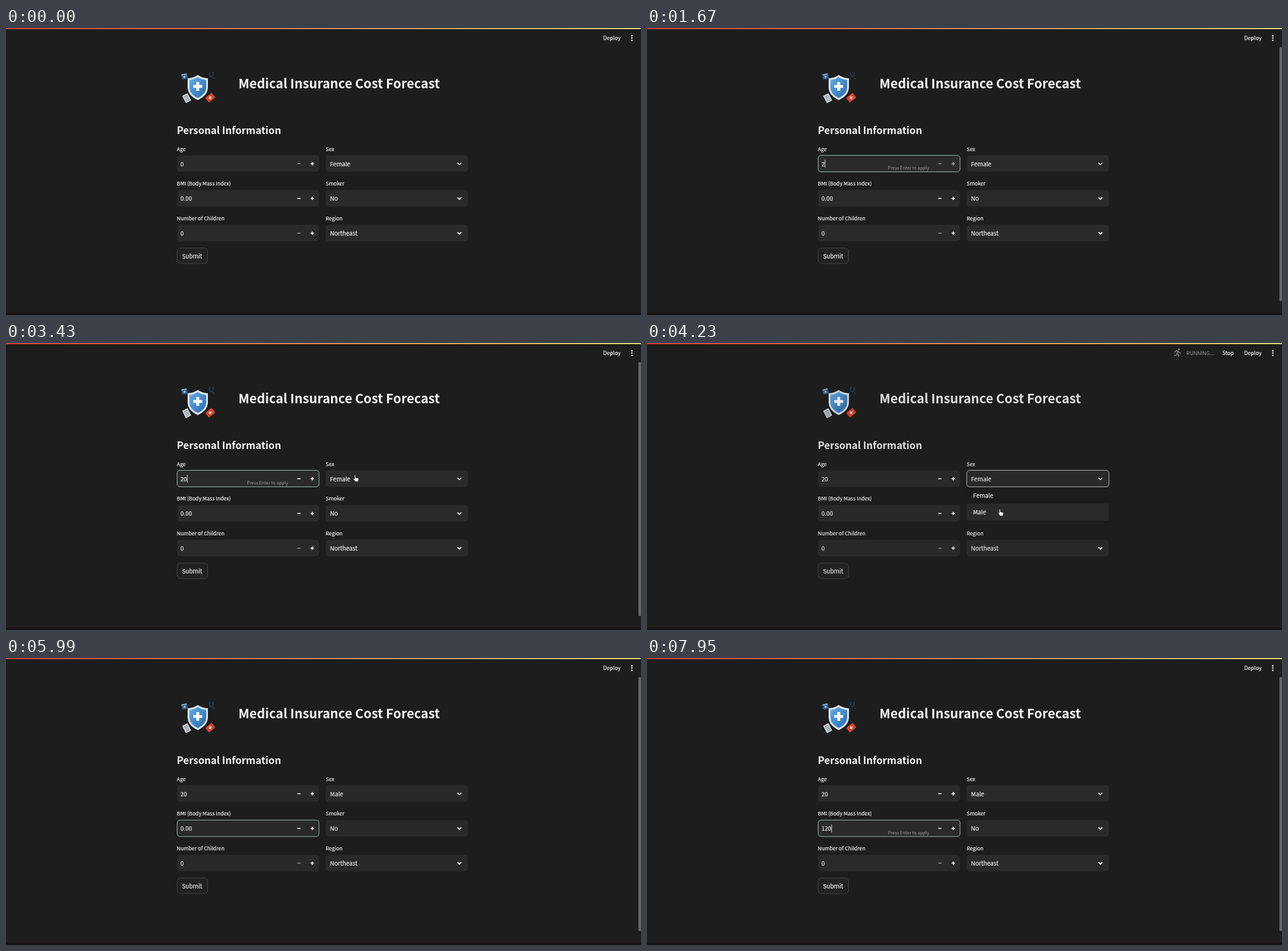
An HTML page that plays this animation: 1000x452 px, repeating every 8000 ms.

```html
<!DOCTYPE html>
<html lang="en">
<head>
<meta charset="utf-8">
<title>Medical Insurance Cost Forecast</title>
<style>
  html, body { margin: 0; width: 100%; height: 100%; overflow: hidden; background: #1d1d1d; }
  svg { display: block; width: 100%; height: 100%; }
  text { font: 400 9.35px "Noto Sans CJK SC", "Noto Sans CJK JP", "Noto Sans CJK", "Open Sans", sans-serif; fill: #f6f6f6; stroke: #f6f6f6; stroke-width: .15; }
  text.title { font-size: 20.25px; font-weight: 600; stroke: none; }
  text.heading { font-size: 15.7px; font-weight: 600; stroke: none; }
  text.label { font-size: 8.2px; }
  text.menu { font-size: 8.35px; font-weight: 500; }
  text.status { font-size: 8.2px; fill: #989898; stroke: none; }
  text.hint { font-size: 7px; fill: #989898; stroke: none; text-anchor: end; }
  .box { fill: #2a2a2a; }
  .icon { fill: none; stroke: #f4f4f4; stroke-width: 1.5; }
</style>
</head>
<body>
<svg id="stage" viewBox="0 0 1000 452">
  <defs>
    <linearGradient id="bar"><stop stop-color="#ee4646"/><stop offset="1" stop-color="#f3ec85"/></linearGradient>
    <linearGradient id="blue" x2="1" y2="1"><stop stop-color="#64aee8"/><stop offset="1" stop-color="#2869ae"/></linearGradient>
  </defs>
  <rect width="1000" height="452" fill="#1d1d1d"/>
  <rect y="448" width="1000" height="4" fill="#171317"/>
  <rect width="1000" height="1.7" fill="url(#bar)"/>
  <rect id="scrollbar" x="996" y="30" width="4" height="400" rx="1.5" fill="#656565"/>

  <text class="menu" x="940.5" y="18.8">Deploy</text>
  <g fill="#f4f4f4"><circle cx="985.5" cy="12.2" r="1.2"/><circle cx="985.5" cy="15.8" r="1.2"/><circle cx="985.5" cy="19.4" r="1.2"/></g>
  <g id="running">
    <g fill="none" stroke="#8a8a8a" stroke-width="1.4" stroke-linecap="round" stroke-linejoin="round">
      <path d="M831 14.5l2.2-2.4 3.2.4 1.4 2.6 2.4.6M836 12.8l-1.6 4 2.8 2v3M834.4 17l-1.4 2.4-2.8.2"/>
      <circle cx="837.6" cy="10" r=".7"/>
    </g>
    <text class="status" x="849.5" y="18.8">RUNNING...</text>
    <text class="menu" x="906" y="18.8">Stop</text>
  </g>

  <g id="header">
    <g transform="rotate(-12 281 76)"><rect x="276.5" y="72" width="9" height="8.5" rx="1" fill="#315d88"/><path d="M277 73.2h8M281 75v4M279 77h4" stroke="#a9d2ef" stroke-width="1.2"/></g>
    <path d="M320.5 69v5.5q2.7 5 5.5 0V69M326 78l3 2" fill="none" stroke="#2b4560" stroke-width="1.3"/>
    <g transform="rotate(-27 284.5 110.5)"><rect x="279.8" y="104" width="9.5" height="13" rx="1" fill="#d3d6d8"/><path d="M281.5 107h6M281.5 109.5h6M281.5 112h6M281.5 114.5h6" stroke="#747b80" stroke-width=".9"/></g>
    <g transform="rotate(-38 321.5 109.5)"><rect x="315" y="105" width="13" height="9.5" rx="1.2" fill="#d8452f"/><path d="M321.5 107.4v4.6M319.2 109.7h4.6" stroke="#fff" stroke-width="1.5"/></g>
    <path d="M302 74q7 5 16 5.3v14q0 13-16 20.2q-16-7.200-16-20.200v-14q9-.3 16-5.300z" fill="#dde6f0"/>
    <path d="M302 77.300q6 4 13.200 4.600v11.500q0 10.600-13.200 16.900q-13.200-6.300-13.200-16.900V81.900q7.200-.6 13.200-4.600z" fill="url(#blue)"/>
    <path d="M302 85v14M295 92h14" stroke="#fff" stroke-width="4.6"/>
    <text class="title" x="366" y="95.2">Medical Insurance Cost Forecast</text>
    <text class="heading" x="269" y="167.2">Personal Information</text>
  </g>

  <g id="numbers"></g>
  <g id="choices"></g>
  <g id="submit">
    <rect x="269.5" y="346.5" width="48" height="24.5" rx="5" fill="#222" stroke="#474747" stroke-width=".9"/>
    <text x="277.3" y="362.5">Submit</text>
  </g>

  <g id="menu">
    <rect x="503" y="228" width="225" height="54" rx="4" fill="#1c1c1c"/>
    <rect id="hover" x="503.5" width="223.5" height="26.5" fill="#2a2a2a"/>
    <text x="513.5" y="243.5">Female</text>
    <text x="513.5" y="269.6">Male</text>
  </g>
  <g id="pointer" stroke="#111" stroke-width=".6">
    <path id="arrow" d="M0 0v8.3l1.9-1.7 1.3 2.9 1.4-.6-1.3-2.8h2.6z" fill="#fff"/>
    <path id="hand" d="M-1.2 0q1-1 1.600 0v3.800l4.300 1.200q.9.5.6 1.800l-.8 3.400h-4.600l-3.200-4.400q.3-1.400 2.100 0z" fill="#fff"/>
  </g>
</svg>
<script>
const LOOP = 8000;
const $ = id => document.getElementById(id);
const ROWS = [200.5, 255.2, 309.9];
const ROW_HEIGHT = 26;

const keys = {
  age: [[0, "0"], [1300, ""], [1600, "2"], [1950, "20"]],
  bmi: [[0, "0.00"], [6200, ""], [6350, "1"], [6600, "12"], [7500, "120"]],
  children: [[0, "0"]],
};
const focus = { age: [750, 3550], bmi: [5150, LOOP], children: [LOOP, LOOP] };
const edited = { age: [1300, 3550], bmi: [6200, LOOP], children: [LOOP, LOOP] };

const path = [
  [350, 400, 5], [700, 345, 200],
  [2250, 370, 195], [2600, 481.5, 22], [2850, 481.5, 22], [3400, 550, 208],
  [3700, 552, 211], [4050, 556, 262], [4450, 556, 262], [4900, 400, 262],
];

function numberField(name, label, y) {
  const mid = y + ROW_HEIGHT / 2;
  $("numbers").insertAdjacentHTML("beforeend", `<g id="${name}">
    <text class="label" x="269" y="${y - 7}">${label}</text>
    <rect class="box" x="269.5" y="${y}" width="223.5" height="${ROW_HEIGHT}" rx="4.5"/>
    <text class="value" x="274.7" y="${mid + 4}"></text>
    <path class="caret" d="M0 ${mid - 6}v12.5" stroke="#e4e4e4" stroke-width=".9"/>
    <text class="hint" x="444.3" y="${mid + 9.7}">Press Enter to apply</text>
    <path class="icon minus" d="M458.7 ${mid + 0.2}h5.2"/>
    <path class="icon plus" d="M479.6 ${mid + 0.2}h5.4m-2.7-2.7v5.4"/></g>`);
}

function choiceField(id, label, value, y) {
  const mid = y + ROW_HEIGHT / 2;
  $("choices").insertAdjacentHTML("beforeend", `
    <text class="label" x="503.5" y="${y - 7}">${label}</text>
    <rect id="${id}Box" class="box" x="503.5" y="${y}" width="224" height="${ROW_HEIGHT}" rx="4.5"/>
    <text id="${id}" x="510.3" y="${mid + 4}">${value}</text>
    <path class="icon" d="M710.9 ${mid - 1.3}l3.1 3 3.1-3"/>`);
}

numberField("age", "Age", ROWS[0]);
numberField("bmi", "BMI (Body Mass Index)", ROWS[1]);
numberField("children", "Number of Children", ROWS[2]);
choiceField("sex", "Sex", "Female", ROWS[0]);
choiceField("smoker", "Smoker", "No", ROWS[1]);
choiceField("region", "Region", "Northeast", ROWS[2]);

const within = (t, [start, end]) => t >= start && t < end;
const lastKey = (list, t) => list.filter(k => k[0] <= t).pop();
const show = (el, on) => el.setAttribute("visibility", on ? "visible" : "hidden");

function ramp(t, ...points) {
  for (let i = 1; i < points.length; i++) {
    const [t0, a] = points[i - 1], [t1, b] = points[i];
    if (t < t1) return a + (b - a) * Math.max(0, (t - t0) / (t1 - t0));
  }
  return points[points.length - 1][1];
}

function outline(box, on, color) {
  box.setAttribute("stroke", on ? color : "none");
  box.setAttribute("stroke-width", 0.9);
}

function drawNumber(name, t) {
  const part = cls => $(name).querySelector("." + cls);
  const [since, text] = lastKey(keys[name], t);
  const active = within(t, focus[name]);
  const value = part("value");
  value.textContent = text;
  outline(part("box"), active, "#9dc2b7");
  const idle = t - Math.max(since, focus[name][0]);
  const caret = part("caret");
  show(caret, active && idle % 1060 < 530);
  caret.setAttribute("transform", `translate(${275.2 + (text ? value.getComputedTextLength() : 0)} 0)`);
  show(part("hint"), within(t, edited[name]));
  part("minus").style.opacity = name === "bmi" || text === "20" ? 1 : 0.5;
  part("plus").style.opacity = text === "2" ? 0.6 : 1;
}

function drawPointer(t) {
  const visible = within(t, [350, 700]) || within(t, [2250, 4800]);
  const next = path.findIndex(p => p[0] > t);
  const hand = visible && within(t, [3350, 4500]);
  show($("hand"), hand);
  show($("arrow"), visible && !hand);
  if (!visible || next < 1) return;
  const [t0, x0, y0] = path[next - 1], [t1, x1, y1] = path[next];
  const k = (t - t0) / (t1 - t0), ease = k * k * (3 - 2 * k);
  $("pointer").setAttribute("transform", `translate(${x0 + (x1 - x0) * ease} ${y0 + (y1 - y0) * ease})`);
}

function draw(t) {
  Object.keys(keys).forEach(name => drawNumber(name, t));
  show($("menu"), within(t, [3600, 4420]));
  $("hover").setAttribute("y", t < 3900 ? 227 : 253);
  $("sex").textContent = t < 4420 ? "Female" : "Male";
  outline($("sexBox"), within(t, [3550, 5150]), "#c4c8c6");
  show($("running"), within(t, [3600, 5900]));
  show($("scrollbar"), within(t, [450, 2450]) || within(t, [2950, 3600]) || t >= 4500);

  const dim = ramp(t, [3700, 1], [4230, 0.9], [5490, 0.7], [5800, 0.7], [6000, 1]);
  const stale = ramp(t, [3700, 1], [4230, 0.93], [4700, 0.88], [5400, 0.38], [5800, 0.38], [6000, 1]);
  $("header").style.opacity = dim;
  $("numbers").style.opacity = (1 + dim) / 2;
  $("choices").style.opacity = $("submit").style.opacity = stale;
  drawPointer(t);
}

function tick() {
  draw(performance.now() % LOOP);
  requestAnimationFrame(tick);
}
tick();
</script>
</body>
</html>
```
